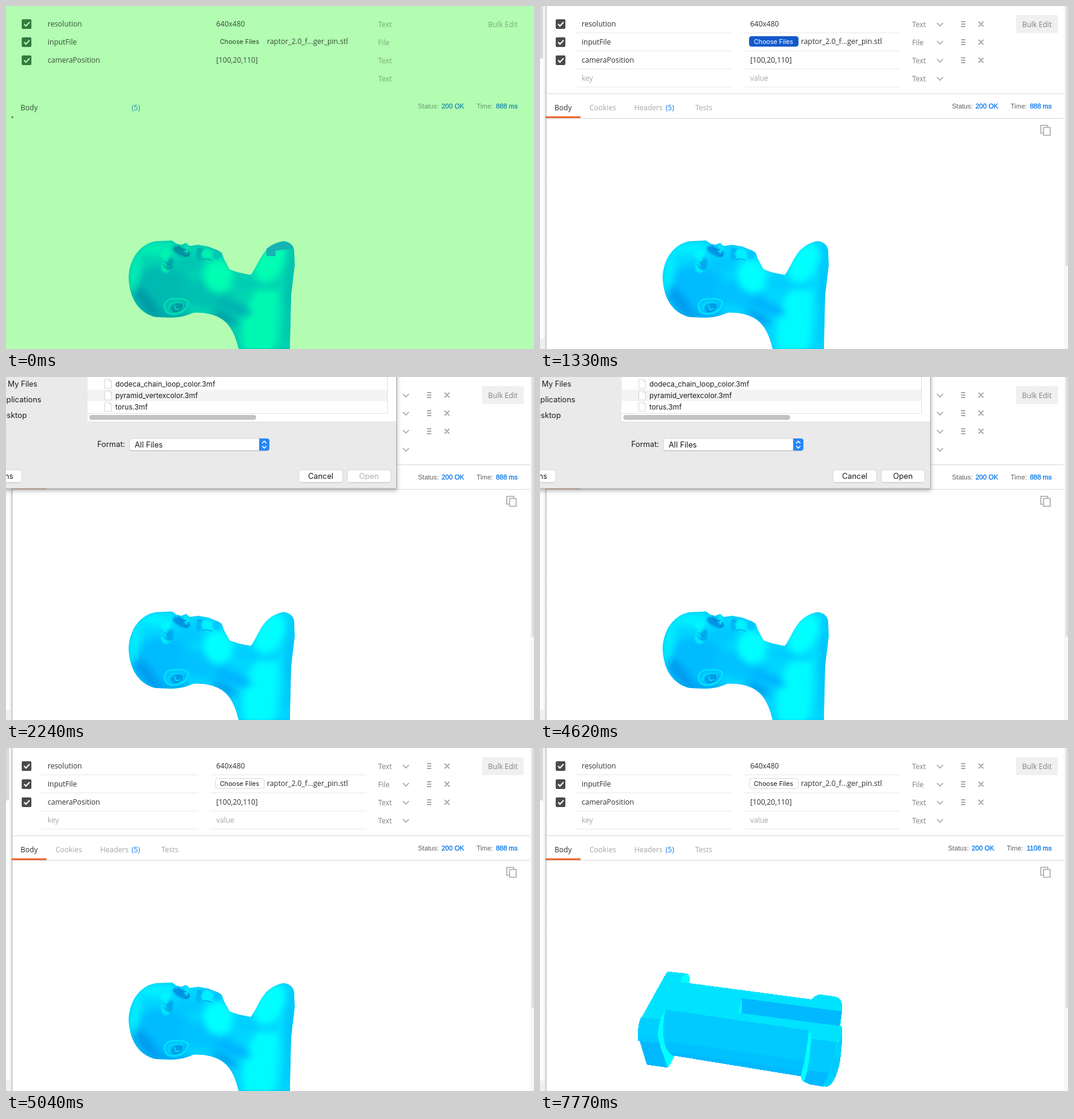
Animation of 874 by 569 pixels, one loop 8000 ms. Source, as an HTML page:

```html
<!DOCTYPE html>
<html lang="en">
<head>
<meta charset="utf-8">
<title>Render API request</title>
<style>
html, body { margin: 0; width: 100%; height: 100%; overflow: hidden; background: #fff; }
svg { display: block; width: 874px; height: 569px; }
text { font: 12px "Open Sans", sans-serif; fill: #303030; white-space: pre; }
.dim { fill: #808080; }
.pale { fill: #a6a6a6; }
.blue { fill: #097bed; }
.stat { font: 11px "Liberation Sans", Arial, sans-serif; }
.stat.dim { fill: #606060; }
.stat.blue { stroke: #097bed; stroke-width: .35; }
.mac { font: 12.8px Inter, sans-serif; fill: #1c1c1c; }
.file { font-size: 11.8px; }
.small { font-size: 10.7px; }
.icon { fill: none; stroke: #a8a8a8; stroke-width: 1.6; }
.btn { fill: #fff; stroke: #cfcfcf; stroke-width: .8; }
.box { fill: #4b4b4b; }
.off { fill: #b4b4b4; }
.idle .mac { fill: #a9a9a9; }
.idle .btn { fill: #f3f3f3; }
.idle .cap { fill: #f3f3f3; }
.flash .soft { display: none; }
.flash .box { fill: #457c58; }
.flash text { opacity: .85; }
.flash .dim { opacity: .65; }
#tint { fill: #b2fdb2; mix-blend-mode: multiply; }
</style>
</head>
<body>
<svg id="stage" viewBox="0 0 874 569" xmlns="http://www.w3.org/2000/svg"></svg>
<script>
const stage = document.getElementById("stage");
const $ = id => document.getElementById(id);

const text = (x, y, s, cls = "", extra = "") => `<text x="${x}" y="${y}" class="${cls}" ${extra}>${s}</text>`;
const rect = (x, y, w, h, fill, extra = "") => `<rect x="${x}" y="${y}" width="${w}" height="${h}" fill="${fill}" ${extra}/>`;
const path = (d, fill, extra = "") => `<path d="${d}" fill="${fill}" ${extra}/>`;
const line = (d, color, width) => path(d, "none", `stroke="${color}" stroke-width="${width}" stroke-linecap="round"`);
const blob = (x, y, rx, ry, fill, turn = 0) =>
  `<ellipse cx="${x}" cy="${y}" rx="${rx}" ry="${ry}" fill="${fill}" transform="rotate(${turn} ${x} ${y})"/>`;
const soft = s => `<g class="soft">${s}</g>`;

function frame() {
  return soft(
    rect(0, 0, 9, 569, "#f7f7f7") + rect(0, 0, 5, 87, "#d9d9d9") + rect(0, 87, 5, 465, "#fdfdfd") +
    rect(0, 552, 9, 17, "#f0f0f0") + rect(8, 0, 4, 569, "url(#edge)") +
    rect(867, 0, 7, 569, "#f7f7f7") + rect(870, 0, 4, 431, "#dedede"));
}

function row(y, key, value, type, on) {
  const tick = rect(26, y - 8, 16, 16, "", 'rx="2" class="box"') +
    path(`M30 ${y}l3 3.2 6-6.4`, "none", 'stroke="#fff" stroke-width="2"');
  const lines = path(`M58 ${y + 14.5}H318M338 ${y + 14.5}H596`, "none", 'stroke="#e9e9e9"');
  const chevron = path(`M657 ${y - 2}l5 5 5-5`, "none", 'class="icon"');
  const tools = path(`M697 ${y - 4}h7m-7 4h7m-7 4h7M726 ${y - 4}l8 8m0-8l-8 8`, "none", 'class="icon" style="stroke-width:1.9"');
  const words = text(69, y + 4, key, on ? "" : "pale") + text(348, y + 4, value, on ? "" : "pale");
  return (on ? tick + words : soft(words)) + text(616, y + 5, type, "dim") + soft(lines + chevron + (on ? tools : ""));
}

function form() {
  return row(30, "resolution", "640x480", "Text", true) +
    row(60, "inputFile", "", "File", true) +
    row(90, "cameraPosition", "[100,20,110]", "Text", true) +
    row(120, "key", "value", "Text", false) +
    soft(rect(346.5, 50.5, 81, 16.5, "", 'rx="3.5" class="btn" id="choose"')) +
    text(354, 63, "Choose Files", "mac small", 'id="chooseText"') +
    text(432, 63, "raptor_2.0_f...ger_pin.stl") +
    soft(rect(788, 15, 69, 30, "#f0f0f0", 'id="bulk"')) + text(798, 35, "Bulk Edit", "dim") +
    soft(rect(10, 145, 857, 1, "#dadada"));
}

function response() {
  return soft(
    rect(11, 186, 856, 1, "#dadada") + rect(9, 183, 58, 3, "#ee6a33") +
    text(82, 173, "Cookies", "pale") + text(156, 173, "Headers", "pale") + text(257, 173, "Tests", "pale") +
    path("M832.5 211H829V198H840.5V201M833.5 201.5H844.5V214.5H833.5Z", "none", 'class="icon"')) +
    text(24, 173, "Body") + text(208, 173, "(5)", "blue") +
    '<g id="stat">' + text(682, 170, "Status:", "stat dim") + text(721, 170, "200 OK", "stat blue") +
    text(779, 170, "Time:", "stat dim") + "</g>" +
    text(847, 170, "", "stat blue", 'id="ms" text-anchor="end"');
}

const BUST = "M203 450C204 420 222 393 250 390L275 389 282 394 290 396 298 393 304 398 318 396 335 399 350 405 357 409" +
  " 361 420 370 437 385 442 405 446C412 438 418 422 426 411C436 397 450 391 460 390C470 391 476 397 477 405" +
  "L478 430 472 480 470 569H385C380 548 372 528 355 518C343 511 325 508 310 509C300 513 290 517 272 517L248 516C220 510 204 485 203 450Z";

function bust() {
  const shade =
    blob(262, 470, 50, 38, "#00bcff", 15) + blob(232, 493, 12, 42, "#009cf0", -38) +
    blob(330, 478, 45, 22, "#00c2ff", 12) + blob(272, 512, 32, 7, "#00a4f0") +
    blob(302, 428, 24, 14, "#00c8ff") + blob(214, 440, 8, 36, "#00f0ff", 8) +
    blob(250, 403, 30, 11, "#00f0ff") + blob(352, 448, 25, 28, "#00ffff", -15) +
    blob(436, 425, 24, 36, "#00ffff", 25) + blob(425, 525, 32, 65, "#00fbff", 12) +
    blob(377, 500, 32, 10, "#00b4ff", 20) + blob(362, 517, 24, 6, "#0098ec", 30) +
    blob(410, 462, 42, 6, "#00cbff", 10) + blob(468, 475, 5, 80, "#00bdf8", 3) +
    blob(453, 500, 4, 75, "#00e0ff", 3);
  const face =
    blob(290, 407, 15, 7, "#0094e4", 25) + blob(266, 430, 9, 13, "#00eaff", 15) +
    blob(271, 428, 6, 10, "#00acf0", 20) + blob(264, 412, 9, 6, "#00f6ff", -20) +
    blob(299, 402, 4, 8, "#00e8ff") + blob(321, 411, 6, 11, "#00b6f4", 12) +
    blob(333, 412, 10, 9, "#00f0ff", 25) + blob(349, 412, 6, 8, "#00c8ff") +
    blob(282, 499, 21, 13, "#00c6ff", -12) + blob(284, 499, 12, 7, "#009ce8", -20);
  const detail =
    line("M264 504C258 491 270 484 283 486C292 484 302 488 302 492C300 503 291 511 277 511C268 511 264 507 265 504", "#00e6ff", 2.2) +
    line("M270 503C269 493 278 490 291 492C297 497 291 505 281 503L279 497", "#00dcff", 2) +
    line("M276 507C286 508 292 502 292 496", "#0088d6", 1.5) +
    line("M260 428C264 437 273 440 276 431M261 424L273 430", "#009ce4", 1.2) +
    line("M285 398L289 404 298 404M296 415C302 416 304 412 302 407", "#0084d4", 1.6) +
    line("M317 402L323 407M325 421C330 418 335 419 340 422", "#00a2e8", 1.4);
  return `<g clip-path="url(#bustClip)">${path(BUST, "#00d5ff")}
    <g filter="url(#wide)">${shade}</g><g filter="url(#near)">${face}</g>${detail}
    ${path(BUST, "none", 'stroke="#00b0f0" stroke-width="2" opacity=".4" filter="url(#near)"')}</g>`;
}

function pin() {
  const top = "#00e3ff", lit = "#00ffff", mid = "#00caff", deep = "#00b9ff";
  return path("M209 373Q211 371 214 371L243 374Q248 377 248 383L247 391 234 389 209 434 190 490 212 528 208 530 180 526 176 523 162 475Q162 460 167 449Z", top) +
    path("M167 447L203 450 197 489 162 486V470Q163 455 167 447Z", "#00d0ff") +
    path("M162 473L196 477 200 492 165 487Z", mid) +
    path("M165 486L198 490 211 530 180 526Q177 526 176 523Z", deep) +
    path("M232 388Q235 376 245 375Q249 380 247 391Z", lit) +
    path("M208 434Q195 453 195 480L211 530Q216 527 223 509L240 440Z", lit) +
    path("M232 388L450 417Q455 409 465 409L487 412Q499 414 500 426V437L497 461 500 462V480L448 470 208 434Z", top) +
    path("M334 415L500 437 495 461 334 440Z", deep) + path("M334 415V440L328 438Z", lit) +
    path("M208 434L447 469 434 545 219 510Q204 500 204 470Q204 448 208 434Z", mid) +
    path("M206 486L441 519 434 545 219 510Q209 503 206 486Z", "#00c1ff") +
    path("M212 503L438 536 434 545 219 510Z", deep) +
    path("M445 469L452 468 451 485 444 550 439 555Q430 551 432 543Q440 515 445 469Z", lit) +
    path("M447 469L500 462V478Q497 486 490 488L449 482Z", top) +
    path("M449 482L490 488Q486 535 470 562L446 558 437 553Q446 530 449 482Z", mid) +
    path("M444 535L484 540 476 555 470 562 446 558 437 553Z", deep) +
    path("M490 488Q498 486 500 477Q500 507 494 530Q487 560 474 562L468 561Q484 535 490 488Z", "#00d3ff") +
    path("M487 513L498 509Q496 530 489 546L481 540Z", mid);
}

function dialog() {
  const row = (y, name) => path(`M163.5 ${y - 7.5}h8l3 3v12h-11zM171.5 ${y - 7.5}v3h3`, "#fff", 'stroke="#d2d2d2" stroke-width=".9"') +
    text(181, y + 4.5, name, "mac file");
  const button = (x, w, label, tx, extra = "") => rect(x, 154, w, 21, "", 'rx="4" class="btn"') +
    path(`M${x + 3} 175.2h${w - 6}`, "none", 'stroke="#bbb" stroke-width=".7"') + text(tx, 169, label, "mac", extra);
  return rect(-20, -300, 666.5, 485, "#eaeaea", 'stroke="#a6a6a6" filter="url(#shadow)"') +
    rect(135, -300, 511, 374.5, "#fff") + rect(135, 21, 497, 19, "#f4f4f4") +
    path("M135 60.5H631.5V-300M135 74.5H646", "none", 'stroke="#e0e0e0"') +
    row(11.5, "dodeca_chain_loop_color.3mf") + row(30.5, "pyramid_vertexcolor.3mf") + row(49.5, "torus.3mf") +
    rect(138, 63, 276, 8, "#c2c2c2", 'rx="4"') +
    text(3, 16, "My Files", "mac", 'style="font-size:12.4px"') +
    text(58.5, 42, "Applications", "mac", 'text-anchor="end"') + text(34.5, 68, "Desktop", "mac", 'text-anchor="end"') +
    text(151, 116, "Format:", "mac") + rect(204.5, 102, 231, 20, "", 'rx="4" class="btn"') +
    path("M204.5 121a4 2 0 0 0 4 1.5h223a4 2 0 0 0 4-1.5", "none", 'stroke="#b4b4b4" stroke-width=".7"') +
    text(213, 117, "All Files", "mac") +
    path("M419 102H432Q436 102 436 106V118Q436 122 432 122H419Z", "#2786f7", 'class="cap"') +
    path("M424 110l3.5-3.5 3.5 3.5M424 114.5l3.5 3.5 3.5-3.5", "none", 'stroke="#fff" stroke-width="1.6"') +
    button(-60, 86, "Options", 12, 'text-anchor="end"') +
    button(485, 72, "Cancel", 500) + button(565, 72, "Open", 584.5, 'id="open"');
}

const blur = (id, r) => `<filter id="${id}" x="-20%" y="-20%" width="140%" height="140%"><feGaussianBlur stdDeviation="${r}"/></filter>`;

stage.innerHTML = `<defs>
  <linearGradient id="edge"><stop offset="0" stop-color="#f0f0f0"/><stop offset=".4" stop-color="#c6c6c6"/><stop offset="1" stop-color="#fff"/></linearGradient>
  <clipPath id="bustClip"><path d="${BUST}"/></clipPath>${blur("wide", 6)}${blur("near", 1.6)}
  <filter id="shadow" x="-5%" y="-5%" width="110%" height="110%"><feDropShadow dx="0" dy="3" stdDeviation="3.5" flood-opacity=".3"/></filter></defs>
  ${rect(0, 0, 874, 569, "#fff")}${frame()}${form()}
  <g id="reply">${response()}<g id="bust">${bust()}</g><g id="pin" shape-rendering="crispEdges">${pin()}</g></g>
  <g id="dialog">${dialog()}</g>
  <g id="flash">${path("M431 415V403Q446 390 462 391Q473 393 476 402L446 406V415Z", "#20b4ff")}
  ${rect(9, 183, 3, 3, "#ad9440")}${rect(0, 0, 874, 569, "", 'id="tint"')}</g>`;

const LOOP = 8000, STEP = 70;
const show = (id, on) => $(id).style.display = on ? "" : "none";

function sheetEdge(t) {
  if (t < 1890 || t >= 5040) return 0;
  if (t < 4830) return [65, 145, 185][Math.min(2, Math.floor((t - 1890) / STEP))];
  return [165, 105, 40][Math.floor((t - 4830) / STEP)];
}

function draw(t) {
  const between = (a, b) => t >= a && t < b;
  const flash = t < 70, done = t >= 7770, edge = sheetEdge(t), pressed = between(1330, 5040);
  stage.classList.toggle("flash", flash);
  show("flash", flash);
  show("reply", !between(6580, 7770));
  show("bust", !done);
  show("pin", done);
  $("stat").setAttribute("transform", `translate(${done ? -6.5 : 0})`);
  $("ms").textContent = done ? "1108 ms" : "888 ms";
  $("choose").style.fill = $("choose").style.stroke = pressed ? "#1259cc" : "";
  $("chooseText").style.fill = pressed ? "#fff" : "";
  $("bulk").style.fill = between(5880, 6020) ? "#e3e3e3" : "";
  show("dialog", edge > 0);
  $("dialog").setAttribute("transform", `translate(0 ${edge - 185})`);
  $("dialog").classList.toggle("idle", between(1890, 2240));
  $("open").classList.toggle("off", t < 4620);
  $("open").style.fill = t < 4620 ? "#b0b0b0" : "";
}

const start = performance.now();
function tick() {
  draw((performance.now() - start) % LOOP);
  requestAnimationFrame(tick);
}
draw(0);
tick();
</script>
</body>
</html>
```
